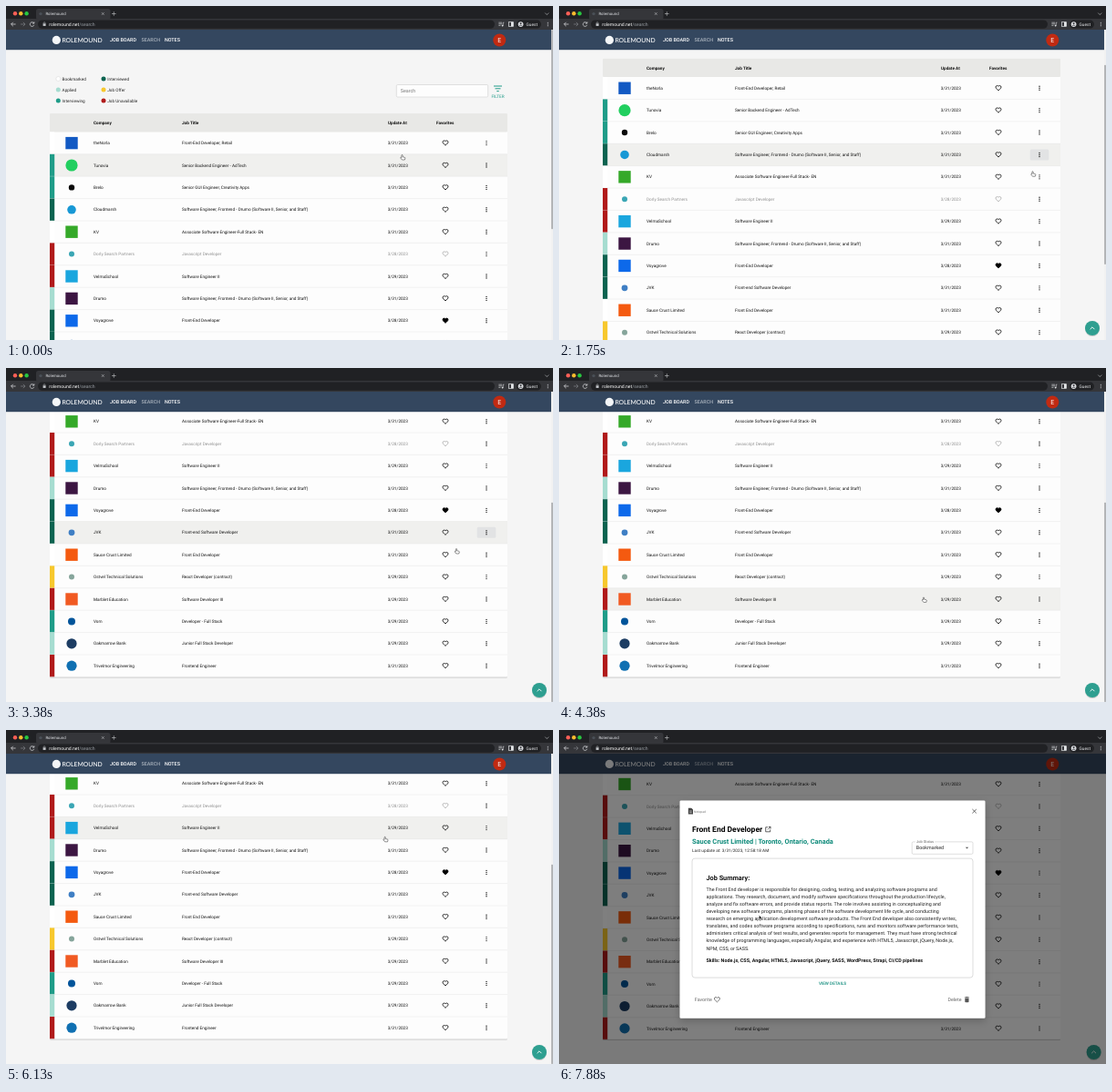
An HTML page for the animation above (8000 ms loop, 600x367 px).

```html
<!DOCTYPE html>
<html lang="en">
<head>
<meta charset="utf-8">
<title>Job board</title>
<style>
  html, body { margin: 0; width: 100%; height: 100%; overflow: hidden; background: #f5f5f5; }
  svg { display: block; width: 600px; height: 367px; }
  text { font-family: Roboto, "Liberation Sans", sans-serif; text-rendering: geometricPrecision; white-space: pre; }
</style>
</head>
<body>
<svg id="stage" viewBox="0 0 600 367" xmlns="http://www.w3.org/2000/svg"></svg>
<script>
const LOOP = 8000, PITCH = 24.4, ROW_TOP = 138.4, MAX_SCROLL = 189.4;
const TEAL = '#1f9c88', GREEN = '#0b6350', RED = '#b01a1a', MINT = '#a6dcd0', YELLOW = '#f7c82d', NONE = '#ffffff';

// company, job title, date, status colour, mark colour, mark shape: side of square, or minus radius
const rows = [
  ['theNorla', 'Front-End Developer, Retail', '3/31/2023', NONE, '#1259c3', 13.4],
  ['Tunovia', 'Senior Backend Engineer - AdTech', '3/31/2023', TEAL, '#21cf5f', -6.6],
  ['Brelo', 'Senior GUI Engineer, Creativity Apps', '3/31/2023', TEAL, '#0a0a0a', -3.2],
  ['Cloudmarsh', 'Software Engineer, Frontend - Drumo (Software II, Senior, and Staff)', '3/31/2023', GREEN, '#1798d5', -4.8],
  ['KV', 'Associate Software Engineer-Full Stack- EN', '3/31/2023', NONE, '#35a929', 13.4],
  ['Dorly Search Partners', 'Javascript Developer', '3/28/2023', RED, '#3aa6b4', -3],
  ['VelmaSchool', 'Software Engineer II', '3/29/2023', RED, '#1aa6de', 13.4],
  ['Drumo', 'Software Engineer, Frontend - Drumo (Software II, Senior, and Staff)', '3/31/2023', MINT, '#3c1642', 13.4],
  ['Voyagrove', 'Front-End Developer', '3/28/2023', GREEN, '#0d69ea', 13.4],
  ['JVK', 'Front-end Software Developer', '3/31/2023', GREEN, '#3f7fc4', -3.4],
  ['Sauce Crust Limited', 'Front End Developer', '3/31/2023', NONE, '#f45a10', 13.4],
  ['Ostvel Technical Solutions', 'React Developer (contract)', '3/29/2023', YELLOW, '#86a59b', -3],
  ['Marblet Education', 'Software Developer III', '3/29/2023', RED, '#f15a22', 13.4],
  ['Vorn', 'Developer - Full Stack', '3/29/2023', TEAL, '#00549a', -4],
  ['Oakmarrow Bank', 'Junior Full Stack Developer', '3/29/2023', MINT, '#1d3d63', -5.6],
  ['Trivelmor Engineering', 'Frontend Engineer', '3/31/2023', RED, '#1070b2', -5.6],
];

const summary = [
  'The Front End developer is responsible for designing, coding, testing, and analyzing software programs and',
  'applications. They research, document, and modify software specifications throughout the production lifecycle,',
  'analyze and fix software errors, and provide status reports. The role involves assisting in conceptualizing and',
  'developing new software programs, planning phases of the software development life cycle, and conducting',
  'research on emerging application development software products. The Front End developer also consistently writes,',
  'translates, and codes software programs according to specifications, runs and monitors software performance tests,',
  'administers critical analysis of test results, and generates reports for management. They must have strong technical',
  'knowledge of programming languages, especially Angular, and experience with HTML5, Javascript, jQuery, Node.js,',
  'NPM, CSS, or SASS.',
];

// Markup helpers; text is placed by its vertical centre.
const text = (s, x, cy, size = 4.667, fill = '#111', more = '') =>
  `<text x="${x}" y="${(cy + size * 0.355).toFixed(2)}" font-size="${size}" fill="${fill}" ${more}>${s}</text>`;
const rect = (x, y, w, h, fill, more = '') =>
  `<rect x="${x}" y="${y}" width="${w}" height="${h}" fill="${fill}" ${more}/>`;
const dot = (x, y, r, fill, more = '') => `<circle cx="${x}" cy="${y}" r="${r}" fill="${fill}" ${more}/>`;
const line = (d, color, width = 0.7, more = '') =>
  `<path d="${d}" fill="none" stroke="${color}" stroke-width="${width}" ${more}/>`;
const BOLD = 'font-weight="700"', MEDIUM = 'font-weight="500"', MID = 'text-anchor="middle"';

const heart = (x, y, color, full) =>
  `<path transform="translate(${x} ${y}) scale(.33) translate(-12 -12.2)" fill="${full ? color : 'none'}"
    stroke="${color}" stroke-width="2.5" d="M16.5 4c-1.74 0-3.41.9-4.5 2.4C10.91 4.9 9.24 4 7.5 4 5 4 3 6 3 8.5
    c0 3.6 3.3 6.4 9 11.5 5.7-5.1 9-7.9 9-11.5C21 6 19 4 16.5 4z"/>`;
const kebab = (x, y, color, gap = 2, r = 0.7) =>
  [-gap, 0, gap].map(d => dot(x, y + d, r, color)).join('');

function mark(x, y, color, shape) {
  return shape < 0 ? dot(x, y, -shape, color) : rect(x - shape / 2, y - shape / 2, shape, shape, color);
}

function tableRow([company, title, date, status, color, shape], i) {
  const y = ROW_TOP + i * PITCH, c = y + PITCH / 2, ink = i === 5 ? '#8f8f8f' : '#111';
  return rect(48, y, 5.2, PITCH, status) + line(`M48 ${y + PITCH}H550`, '#dedede', 0.4) +
    mark(72, c, color, shape) + text(company, 96, c, 4.667, ink) + text(title, 193, c, 4.667, ink) +
    text(date, 418.7, c, 4.667, ink) + heart(482, c, i === 5 ? '#aaa' : '#000', i === 8) + kebab(527, c, '#111');
}

function legend() {
  const items = [['Bookmarked', NONE], ['Applied', MINT], ['Interviewing', TEAL],
    ['Interviewed', GREEN], ['Job Offer', YELLOW], ['Job Unavailable', RED]];
  return items.map(([label, color], i) => {
    const x = i < 3 ? 57.3 : 107, y = 80 + (i % 3) * 12;
    return dot(x, y, 2.5, color, i ? '' : 'stroke="#ccc" stroke-width=".4"') + text(label, x + 4.3, y, 4.667, '#222');
  }).join('');
}

const page = () => legend() +
  rect(428.3, 86.5, 100.4, 13.5, '#fdfdfd', 'rx="1.3" stroke="#c4c4c4" stroke-width=".5"') +
  text('Search', 432.8, 93.3, 5.33, '#777') +
  line('M535 88H544M536.5 90.8H542.5M538.3 93.6H540.7', TEAL, 1) +
  text('FILTER', 539.5, 99, 4.667, TEAL, MID) +
  rect(48, 118, 502, ROW_TOP - 118 + PITCH * 16, '#fdfdfd', 'rx="1" filter="url(#soft)"') +
  rect(48, 118, 502, ROW_TOP - 118, '#e8e8e6', 'rx="1"') +
  [['Company', 96], ['Job Title', 193], ['Update At', 419], ['Favorites', 472]]
    .map(([s, x]) => text(s, x, 128.6, 4.667, '#111', BOLD)).join('') +
  `<g id="hover">${rect(48, 0, 502, PITCH, '#f0f0ee')}</g>` +
  `<rect id="button" x="516.7" width="20.6" height="12" rx="1.5" fill="#e2e3e4"/>` +
  rows.map(tableRow).join('');

const nav = () => rect(0, 26, 600, 22.2, '#34475f') + dot(55.3, 37.4, 4.6, '#f4f6f8') +
  `<text x="61.4" y="39.9" font-size="6.8" font-weight="500" fill="#fff" style="font-family:Lato,sans-serif">ROLEMOUND</text>` +
  text('JOB BOARD', 114, 37.5, 5.4, '#fff', MEDIUM) + text('SEARCH', 148.4, 37.5, 5.4, '#a9b2bd', MEDIUM) +
  text('NOTES', 174, 37.5, 5.4, '#fff', MEDIUM) +
  dot(541.3, 37.5, 7, '#c02a12') + text('E', 541.3, 37.5, 7, '#fff', MID);

const chrome = () => rect(0, 0, 600, 14.5, '#202124') + rect(0, 14, 600, 12, '#35363a') +
  rect(33, 3, 81.5, 12, '#35363a', 'rx="2.5"') +
  dot(10, 8.2, 2.2, '#fe5f57') + dot(16.3, 8.2, 2.2, '#febc2e') + dot(22.6, 8.2, 2.2, '#28c840') +
  dot(38, 8.6, 1.7, '#4a4f57') + text('Rolemound', 43.4, 8.6, 4.4, '#dfe1e5') +
  line('M105 7.2l2.6 2.6m0-2.6l-2.6 2.6M116 8.5h4.6m-2.3-2.3v4.6M591.3 7.6l2 2 2-2', '#c8cacd', 0.6) +
  rect(35, 15.4, 501, 9.4, '#202124', 'rx="4.7"') +
  line('M10.6 20H5.6m2.2-2.2L5.6 20l2.2 2.2', '#e4e6e8') +
  line('M16 20h5m-2.2-2.2L21 20l-2.2 2.2', '#7d8084') +
  line('M30.6 18.9a2.3 2.3 0 1 0 .2 1.9M30.9 17.4v1.7h-1.8', '#e4e6e8') +
  rect(40.6, 19.3, 3, 2.6, '#c5c8cc') + line('M41.2 19.4v-.8a.9.9 0 0 1 1.8 0v.8', '#c5c8cc', 0.5) +
  text('rolemound.net<tspan fill="#9aa0a6">/search</tspan>', 47.3, 20.1, 5.1, '#fff') +
  line('M540.4 18.2h3.6M540.4 19.8h3.6M540.4 21.4h2M545.2 21.6v-3.4h1.2', '#e4e6e8', 0.6) + dot(544.6, 21.6, 0.9, '#e4e6e8') +
  rect(551.6, 17.7, 4.8, 4.6, 'none', 'stroke="#e4e6e8" stroke-width=".7"') + rect(554, 17.7, 2.4, 4.6, '#e4e6e8') +
  rect(560, 15.6, 27, 9, '#202124', 'rx="4.5"') + dot(564.6, 20.1, 2.9, '#dadce0') +
  dot(564.6, 19.3, 1, '#35363a') + line('M562.9 22a2 1.5 0 0 1 3.4 0', '#35363a', 0.8) +
  text('Guest', 570.6, 20.1, 4.8, '#e8eaed') + kebab(594.3, 20, '#dfe1e5', 1.7, 0.55);

// Header and footer shared by both dialogs, drawn from the dialog's own top.
function dialog(id, top, height, title, iconX, company, updated, status, body) {
  const foot = height - 20.5;
  return `<g id="${id}" transform="translate(0 ${top})">` +
    rect(132.5, 0, 335, height, '#fff', 'rx="1.4" filter="url(#deep)"') +
    `<path d="M141.8 8.4h3.4l1.8 1.8v5h-5.2z" fill="#444"/>` + line('M143 11.6h2.8M143 13.3h2.8', '#fff', 0.5) +
    text('Notepad', 148, 12, 3.4, '#777') + line('M453.4 9.6l4.4 4.4m0-4.4l-4.4 4.4', '#444', 0.8) +
    text(title, 146, 31.6, 8.53, '#000', BOLD) +
    line(`M${iconX} 29.4h-2.3v5h5v-2.3M${iconX + 0.8} 29h2.2v2.2m0-2.2l-3 3`, '#222', 0.7) +
    text(company, 146, 44.8, 7.4, '#0d8a7a', BOLD) +
    text('Last update at: ' + updated, 146, 55, 4.667, '#222', 'letter-spacing=".05"') +
    rect(387.2, 45.5, 66.8, 13.4, '#fff', 'rx="1.3" stroke="#bdbdbd" stroke-width=".5"') +
    rect(390.6, 44.6, 21.6, 2, '#fff') + text('Job Status', 392, 45.4, 4, '#666') +
    text(status, 391.8, 52.2, 5.33, '#222', 'letter-spacing=".04"') + `<path d="M445.8 51.4h3.4l-1.7 1.8z" fill="#555"/>` + body +
    text('Favorite', 148.8, foot, 5.33, '#666') + heart(173.4, foot, '#555') +
    text('Delete', 426.5, foot, 5.33, '#666') +
    `<path d="M445.3 ${foot - 1.6}h4.2v3.8q0 .8-.8.8h-2.6q-.8 0-.8-.8zM444.9 ${foot - 2.8}h1.4l.4-.4h1.4l.4.4h1.4v.7h-5z" fill="#555"/></g>`;
}

const survey = text('How did the company inform you of their decision to move on with another candidate?',
    197.6, 86.5, 5.33, '#222', 'letter-spacing=".016"') +
  ['I got an email', 'I received a phone call', 'They ghost me', 'Other'].map((s, i) => {
    const y = 103 + i * 14;
    return dot(201, y, 3, 'none', 'stroke="#666" stroke-width=".7"') + text(s, 208, y, 5.33, '#222', 'letter-spacing=".05"');
  }).join('') +
  rect(374.3, 157.8, 28, 12, '#2f4564', 'rx="1.3" filter="url(#soft)"') +
  text('SUBMIT', 388.3, 163.8, 4.6, '#fff', MID + ' ' + MEDIUM);

const details = rect(146, 63.7, 308, 131, '#fff', 'rx="3" stroke="#b8b8b8" stroke-width=".5"') +
  text('Job Summary:', 161.5, 84.6, 7.3, '#111', BOLD) +
  summary.map((s, i) => text(s, 161.5, 97.5 + i * 8.1, 5.35, '#222')).join('') +
  text('Skills: Node.js, CSS, Angular, HTML5, Javascript, jQuery, SASS, WordPress, Strapi, CI/CD pipelines',
    161.5, 175.2, 5.4, '#111', BOLD) +
  text('VIEW DETAILS', 300, 201.2, 4.667, '#0d8a7a', MID + ' ' + MEDIUM);

const shadow = (id, dy, blur, alpha) => `<filter id="${id}" x="-10%" y="-10%" width="120%" height="125%">
  <feDropShadow dx="0" dy="${dy}" stdDeviation="${blur}" flood-opacity="${alpha}"/></filter>`;

const stage = document.getElementById('stage');
stage.innerHTML = `<defs>${shadow('soft', 0.7, 0.7, 0.28)}${shadow('deep', 3, 4, 0.22)}</defs>` +
  rect(0, 0, 600, 367, '#f5f5f5') + `<g id="page">${page()}</g>` +
  `<g id="up">${dot(585, 354, 8, '#2f9f90', 'filter="url(#soft)"')}${line('M582.6 355.2l2.4-2.4 2.4 2.4', '#fff', 0.9)}</g>` +
  nav() + `<g id="bar">${rect(598, 26, 2, 341, '#f1f1f1')}<rect id="thumb" x="598.2" width="1.7" height="219.3" rx=".8" fill="#a9abad"/></g>` +
  `<rect id="shade" y="26" width="600" height="341"/>` +
  dialog('first', 88, 218, 'Software Developer III', 236.6, 'Marblet Education | Toronto, Ontario, Canada',
    '3/29/2023, 12:38:04 PM', 'Job Unavailable', survey) +
  dialog('second', 77.4, 239.4, 'Front End Developer', 229, 'Sauce Crust Limited | Toronto, Ontario, Canada',
    '3/31/2023, 12:58:18 AM', 'Bookmarked', details) +
  chrome() +
  `<g id="cursor"><path id="hand" fill="#fff" stroke="#222" stroke-width=".5" stroke-linejoin="round"
    d="M-.6.6c0-.9 1.2-.9 1.2 0v1.6l2.1.5c.5.1.7.5.6 1L2.8 5.4H-.1L-1.7 3.4c-.3-.6.4-1 .9-.6l.2.2z"/>
  <path id="arrow" fill="#000" stroke="#fff" stroke-width=".35" d="M0 0v4.4l1-.9.7 1.6.8-.3-.7-1.6h1.4z"/></g>`;

const $ = Object.fromEntries([...stage.querySelectorAll('[id]')].map(n => [n.id, n]));

// Keyframes: time, then values.
const scrollKeys = [[0, 0], [500, 0], [950, 30], [1350, 30], [2150, 90.5], [2500, 90.5], [3150, MAX_SCROLL]];
const cursorKeys = [[0, 434.5, 163.6], [300, 434.5, 163.6], [1050, 516.5, 181], [1300, 516.5, 181], [2200, 522.5, 182.6],
  [2500, 522.5, 182.6], [3000, 526, 181], [3250, 526, 181], [3380, 494, 198.6], [4200, 400, 252], [4700, 400, 252],
  [5380, 443.5, 120.5], [5650, 455.5, 100.5], [5900, 455.5, 100.5], [6800, 212.5, 203.8], [7300, 212.5, 203.8], [7800, 219.5, 203.5]];
const firstKeys = [[4650, 0], [4870, 1], [5850, 1], [6050, 0]];
const secondKeys = [[7260, 0], [7480, 1], [7999, 1]];

function at(keys, t) {
  if (t <= keys[0][0]) return keys[0].slice(1);
  const i = keys.findIndex(k => k[0] > t);
  if (i < 0) return keys[keys.length - 1].slice(1);
  const a = keys[i - 1], b = keys[i], p = (t - a[0]) / (b[0] - a[0]), e = p * p * (3 - 2 * p);
  return a.slice(1).map((v, n) => v + (b[n + 1] - v) * e);
}

const show = (node, on) => node.setAttribute('visibility', on ? 'visible' : 'hidden');
const move = (node, x, y) => node.setAttribute('transform', `translate(${x} ${y})`);

function draw(t) {
  const [scroll] = at(scrollKeys, t), [x, y] = at(cursorKeys, t);
  const [first] = at(firstKeys, t), [second] = at(secondKeys, t);
  const fade = Math.max(first, second), open = fade > 0;
  // Hiding the scroll bar lets the page settle and the corner button slide right.
  move($.page, 0, (open ? 0.7 : 0) - scroll);
  move($.up, open ? 1.6 : 0, 0);
  $.thumb.setAttribute('y', 26 + scroll * 341 / (341 + MAX_SCROLL));
  show($.bar, !open);
  show($.up, scroll > 60);

  // The highlight trails the pointer slightly.
  const [hx, hy] = at(cursorKeys, t - 125), pageY = hy + at(scrollKeys, t - 125)[0];
  const row = Math.floor((pageY - ROW_TOP) / PITCH), rowY = ROW_TOP + row * PITCH;
  const over = !open && row >= 0 && row < rows.length;
  show($.hover, over);
  move($.hover, 0, rowY);
  $.button.setAttribute('y', rowY + PITCH / 2 - 6);
  show($.button, over && Math.abs(hx - 527) < 10 && Math.abs(pageY - rowY - PITCH / 2) < 6);

  $.shade.setAttribute('opacity', fade * 0.5);
  $.first.setAttribute('opacity', first);
  $.second.setAttribute('opacity', second);
  show($.hand, !open);
  show($.arrow, open);
  move($.cursor, x, y);
}

function tick() {
  draw(performance.now() % LOOP);
  requestAnimationFrame(tick);
}
tick();
</script>
</body>
</html>
```
